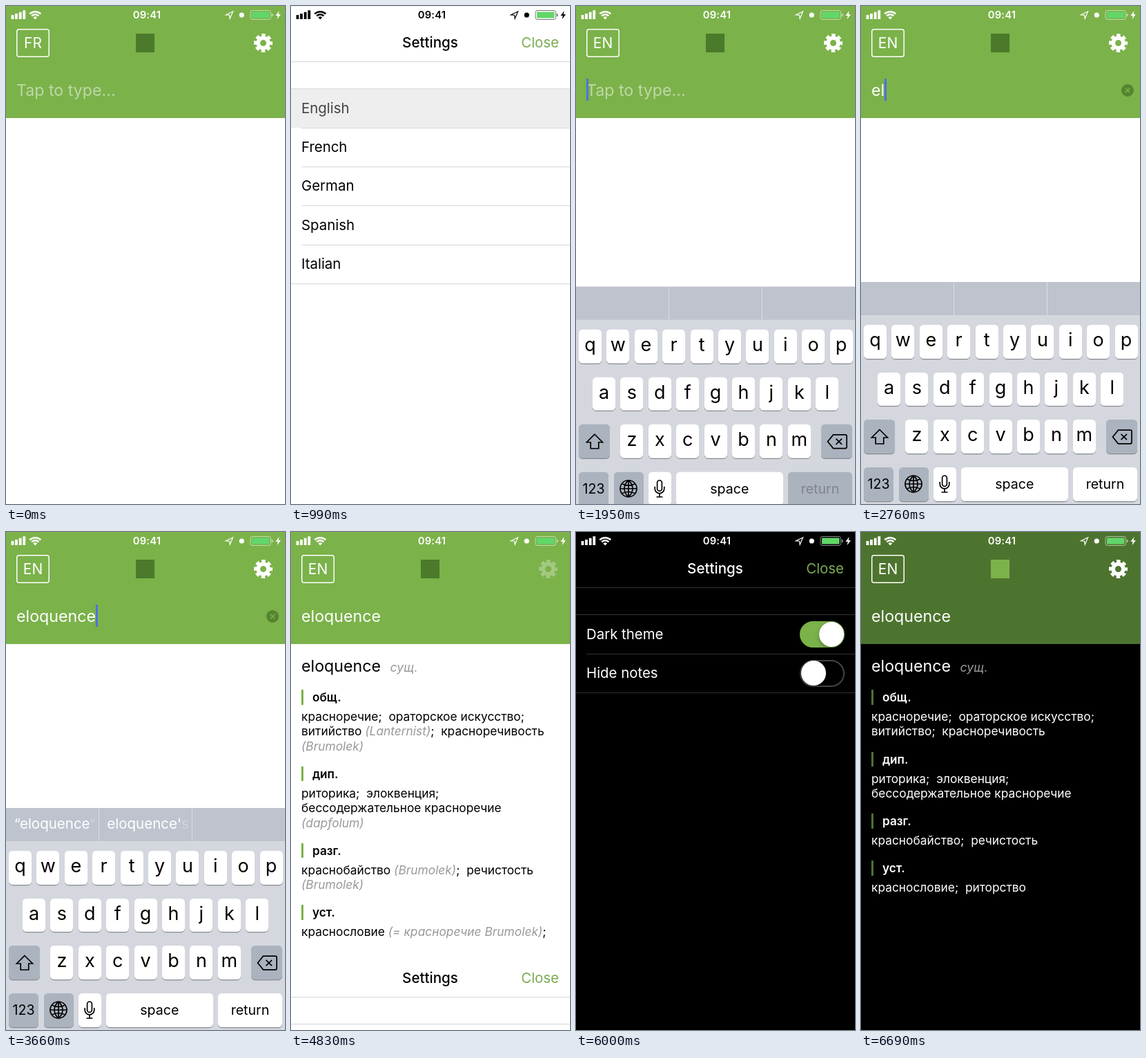
Animation of 404x720 px, one loop 7720 ms. Source, as an HTML page:

```html
<!DOCTYPE html>
<html lang="en">
<head>
<meta charset="utf-8">
<title>Dictionary app</title>
<style>
html, body { margin: 0; width: 100%; height: 100%; overflow: hidden; background: #fff; }
#stage {
  --head: #7bb24a; --logo: #4b7a2b; --bg: #fff; --fg: #000; --line: #d6d6d6; --tint: #7bab52; --track: #e4e4e4;
  position: relative; width: 404px; height: 720px; overflow: hidden;
  background: var(--bg); color: var(--fg);
  font: 400 20.4px/24px Inter, "Open Sans", sans-serif; white-space: nowrap;
}
#stage.dark { --head: #4d742e; --logo: #7bb24a; --bg: #000; --fg: #fff; --line: #333; --track: #444; }
#stage * { box-sizing: border-box; }
#stage div, #stage svg { position: absolute; }
svg { overflow: visible; fill: none; }

#head { width: 404px; height: 162px; background: var(--head); color: #fff; }
#lang { left: 15px; top: 33px; width: 48px; height: 40.5px; box-shadow: inset 0 0 0 1.5px #fff; border-radius: 4px; text-align: center; font-size: 21px; line-height: 41px; }
#logo { left: 188px; top: 40px; width: 27px; height: 27px; background: var(--logo); }
#gear { left: 359px; top: 39.5px; }
#field { left: 15px; top: 105px; height: 33px; font-size: 23.2px; line-height: 35px; }
#hint { left: 0; top: 0; opacity: .5; }
#caret { left: 100%; top: 0; width: 2.6px; height: 32px; background: #4a74dc; }
#clear { left: 376.5px; top: 113px; }

#entry { left: 15px; top: 182px; width: 374px; white-space: normal; font-size: 17.35px; line-height: 21.3px; }
#entry h1 { margin: 0 0 20.3px; font: 400 23.2px/24px Inter, sans-serif; }
#entry h1 i { margin-left: 7px; font-size: 17.8px; color: #999; }
#entry h2 { margin: 0 0 6.6px; padding-left: 13px; border-left: 3px solid var(--head); font: 600 17.2px/21.3px Inter, sans-serif; }
#entry p { margin: 0 0 19px; }
#entry em { color: #999; }
#entry.brief em { display: none; }

#keys { left: 0; top: 399px; width: 404px; height: 321px; background: #d4d7de; color: #000; }
#bar { width: 404px; height: 48px; background: #bfc3ce; color: #fff; font-size: 20.5px; line-height: 45px; }
#bar div { height: 48px; width: 135px; padding-left: 7px; border-right: 1px solid #d9dce3; text-align: center; }
#bar div + div { left: 135px; }
.key { height: 48.5px; border-radius: 5.5px; background: #fff; box-shadow: 0 1.2px 0 #878a90; text-align: center; font-size: 27px; line-height: 44.5px; }
.key.word { font-size: 19.6px; line-height: 48px; }
.key.grey { background: #abb3be; }
.key.off { color: #7f858d; }
.key svg { left: 50%; top: 50%; stroke: #000; stroke-width: 1.7; }

#modal { width: 404px; height: 720px; background: var(--bg); }
#title { left: 0; width: 403px; top: 41.3px; text-align: center; font-weight: 500; font-size: 20.6px; }
#close { right: 16px; top: 41.3px; color: var(--tint); }
.rule { left: 0; right: 0; height: 1px; background: var(--line); }
.row { left: 0; width: 404px; height: 56.4px; padding-left: 15px; line-height: 56.4px; }
.row.hit { background: #eee; color: #444; }
.switch { left: 324px; top: 9px; width: 64.5px; height: 38.5px; border-radius: 20px; border: 2px solid var(--track); }
.knob { left: -.5px; top: -.8px; width: 36px; height: 36px; border-radius: 50%; background: #fff; box-shadow: 0 3px 6px #0004, 0 0 1px #0006; }

#status { width: 404px; height: 26px; }
#clock { left: 0; width: 408px; top: 1px; text-align: center; font-size: 14.8px; font-weight: 600; letter-spacing: .2px; }
</style>
</head>
<body>
<div id="stage">
  <div id="entry">
    <h1>eloquence <i>сущ.</i></h1>
    <h2>общ.</h2>
    <p>красноречие;&nbsp; ораторское искусство;&nbsp; витийство<em> (Lanternist)</em>;&nbsp; красноречивость<em> (Brumolek)</em></p>
    <h2>дип.</h2>
    <p>риторика;&nbsp; элоквенция;&nbsp; бессодержательное красноречие<em> (dapfolum)</em></p>
    <h2>разг.</h2>
    <p>краснобайство<em> (Brumolek)</em>;&nbsp; речистость<em> (Brumolek)</em></p>
    <h2>уст.</h2>
    <p>краснословие<em> (= красноречие Brumolek)</em>;&nbsp; риторство<em> (Brumolek)</em></p>
  </div>

  <div id="head">
    <div id="lang">FR</div>
    <div id="logo"></div>
    <svg id="gear" width="27" height="27" stroke="#fff">
      <circle cx="13.5" cy="13.5" r="7.4" stroke-width="5.8"/>
      <circle cx="13.5" cy="13.5" r="11" stroke-width="5" stroke-dasharray="5.2 3.44" stroke-dashoffset="2.6"/>
    </svg>
    <div id="field"><div id="hint">Tap to type...</div><span id="typed"></span><div id="caret"></div></div>
    <svg id="clear" width="18" height="18">
      <circle cx="9" cy="9" r="9" fill="#55842f"/>
      <path d="M5.7 5.7l6.6 6.6m0-6.6l-6.6 6.6" stroke="#7bb24a" stroke-width="1.6"/>
    </svg>
  </div>

  <div id="keys">
    <div id="bar">
      <div><span id="quoted"></span><span id="endquote">“</span></div>
      <div><span id="guess"></span><span id="tail">s</span></div>
    </div>
  </div>

  <div id="modal">
    <div id="title">Settings</div>
    <div id="close">Close</div>
    <div class="rule" style="top:80px"></div>
    <div class="rule" style="top:119px"></div>
    <div id="langs"></div>
    <div id="options"></div>
  </div>

  <div id="status">
    <svg width="404" height="26" stroke="currentColor">
      <path d="M9.5 19v-6M15 19v-8M20.7 19v-10.3M26.3 19V6.3" stroke-width="3.8"/>
      <path d="M34.3 11.4a11.5 11.5 0 0 1 16 0M37.2 14.4a7.4 7.4 0 0 1 10.2 0" stroke-width="2.5"/>
      <path d="M42.3 19.6l-2.9-3a4.1 4.1 0 0 1 5.8 0z" fill="currentColor" stroke="none"/>
      <path d="M318.5 12.8L328.6 8l-4.4 10.2-.7-5z" stroke-width="1.2"/>
      <circle cx="341.3" cy="13" r="3.6" fill="currentColor" stroke="none"/>
      <rect x="354" y="6.5" width="29.5" height="13" rx="3" stroke-opacity=".55"/>
      <rect x="356" y="8.5" width="25.5" height="9" rx="1" fill="#62d669" stroke="none"/>
      <path d="M385.6 11v4" stroke-opacity=".6" stroke-width="1.6"/>
      <path d="M395.6 7l-5.2 7h3.2l-1 5.2 5.2-7.2h-3.2z" fill="currentColor" stroke="none"/>
    </svg>
    <div id="clock">09:41</div>
  </div>
</div>

<script>
const $ = id => document.getElementById(id);
const LOOP = 7720, WORD = 'eloquence';
const PITCH = 40.4, ROWS = [62, 130.7, 199.4, 268];

function add(parent, cls, html, style) {
  const el = document.createElement('div');
  el.className = cls;
  el.innerHTML = html;
  Object.assign(el.style, style);
  parent.append(el);
  return el;
}

// Keyboard
const key = (label, x, row, w = 33, cls = '') =>
  add($('keys'), 'key ' + cls, label, { left: x + 'px', top: ROWS[row] + 'px', width: w + 'px' });
const icon = d => `<svg width="1" height="1"><path d="${d}"/></svg>`;

[['qwertyuiop', 4], ['asdfghjkl', 24], ['zxcvbnm', 64.4]].forEach(([letters, x], row) =>
  [...letters].forEach((c, i) => key(c, x + i * PITCH, row)));
key(icon('M0-10.5L11.5 1H5.8V10H-5.8V1H-11.5Z'), 4, 2, 45, 'grey');
key(icon('M-5.5-9.8H12a2 2 0 0 1 2 2V7.8a2 2 0 0 1-2 2H-5.5L-13.5 0ZM-1.5-4.2L7 4.2M7-4.2L-1.5 4.2'), 355, 2, 45, 'grey');
key('123', 4, 3, 43, 'word grey');
key(icon('M-12 0a12 12 0 1 0 24 0a12 12 0 1 0-24 0H12M0-12V12M0-12c-8 7-8 17 0 24c8-7 8-17 0-24M-9.5-7q9.5 5 19 0M-9.5 7q9.5-5 19 0'), 54.5, 3, 43, 'grey');
key(icon('M-3.4-8.6a3.4 3.4 0 0 1 6.8 0V0a3.4 3.4 0 0 1-6.8 0ZM-6.8-3V0a6.8 6.8 0 0 0 13.6 0V-3M0 7V12M-4.5 12H4.5'), 104.8, 3);
key('space', 145, 3, 154.5, 'word');
const enter = key('return', 307, 3, 93, 'word');

// Settings lists
function list(box, labels) {
  return labels.map((label, i) => {
    const y = 119.6 + i * 56.4, last = i === labels.length - 1;
    const row = add(box, 'row', label, { top: y + 'px' });
    add(box, 'rule', '', { top: Math.round(y + 56) + 'px', left: last ? 0 : '15px', width: last ? '404px' : '389px' });
    return row;
  });
}
const english = list($('langs'), ['English', 'French', 'German', 'Spanish', 'Italian'])[0];
const switches = list($('options'), ['Dark theme', 'Hide notes']).map(row => {
  const track = add(row, 'switch', '');
  return { track, knob: add(track, 'knob', '') };
});

// Motion
const clamp = v => Math.max(0, Math.min(1, v));
const ease = v => v * v * (3 - 2 * v);
const within = (t, a, b) => t >= a && t < b;
const show = (el, on) => { el.style.visibility = on ? '' : 'hidden'; };
const text = (el, s) => { if (el.textContent !== s) el.textContent = s; };

// critically damped spring, 0 to 1
function spring(t, start, rate = 19.3) {
  const x = Math.max(0, t - start) / 1000 * rate;
  return 1 - (1 + x) * Math.exp(-x);
}

function modalAt(t) {
  if (t < 30) return 0;
  if (t < 1650) return spring(t, -8) - spring(t, 990);
  if (t < 4830) return 0;
  return spring(t, 4791.5) - spring(t, 6355);
}

function draw(t) {
  const dark = t >= 5700, focus = within(t, 1710, 3930);
  $('stage').classList.toggle('dark', dark);

  const up = modalAt(t);
  $('modal').style.transform = `translateY(${720 * (1 - up)}px)`;
  show($('modal'), up > .002);
  const v = dark ? 255 : Math.round(255 * (1 - clamp((up - .2) / .6)));
  $('status').style.color = `rgb(${v},${v},${v})`;

  $('langs').style.display = t < 1650 ? '' : 'none';
  $('options').style.display = t < 1650 ? 'none' : '';
  english.classList.toggle('hit', within(t, 840, 1650));
  switches.forEach(({ track, knob }, i) => {
    const on = ease(clamp((t - 5610 - i * 420) / 240));
    knob.style.transform = `translateX(${26 * on}px)`;
    track.style.background = `rgba(123,178,74,${on})`;
    track.style.borderColor = on > .5 ? '#7bb24a' : '';
  });

  text($('lang'), t < 990 ? 'FR' : 'EN');
  $('lang').style.opacity = within(t, 30, 300) ? .3 : 1;
  $('gear').style.opacity = within(t, 4830, 5200) ? .3 : 1;

  // typing
  const count = Math.max(0, Math.min(9, Math.floor((t - 2500) / 140) + 1));
  const typed = WORD.slice(0, count), done = count === 9;
  text($('typed'), typed);
  show($('hint'), !count);
  show($('caret'), focus);
  show($('clear'), focus && count > 0);
  enter.classList.toggle('grey', !count);
  enter.classList.toggle('off', !count);

  const fade = done ? clamp((t - 3610) / 180) : 1;
  text($('quoted'), count > 3 ? '“' + typed : '');
  text($('guess'), count > 3 ? WORD + (done ? "'" : '') : '');
  $('endquote').style.opacity = count > 3 ? fade : 0;
  $('tail').style.display = done ? '' : 'none';
  $('tail').style.opacity = fade;

  const kb = t < 1710 ? 0 : spring(t, 1672, 20.7) - spring(t, 3930);
  $('keys').style.transform = `translateY(${321 * (1 - kb)}px)`;
  show($('keys'), kb > .002);

  show($('entry'), t >= 4260);
  $('entry').classList.toggle('brief', t >= 6030);
}

const start = performance.now();
function tick() {
  draw((performance.now() - start) % LOOP);
  requestAnimationFrame(tick);
}
tick();
</script>
</body>
</html>
```
